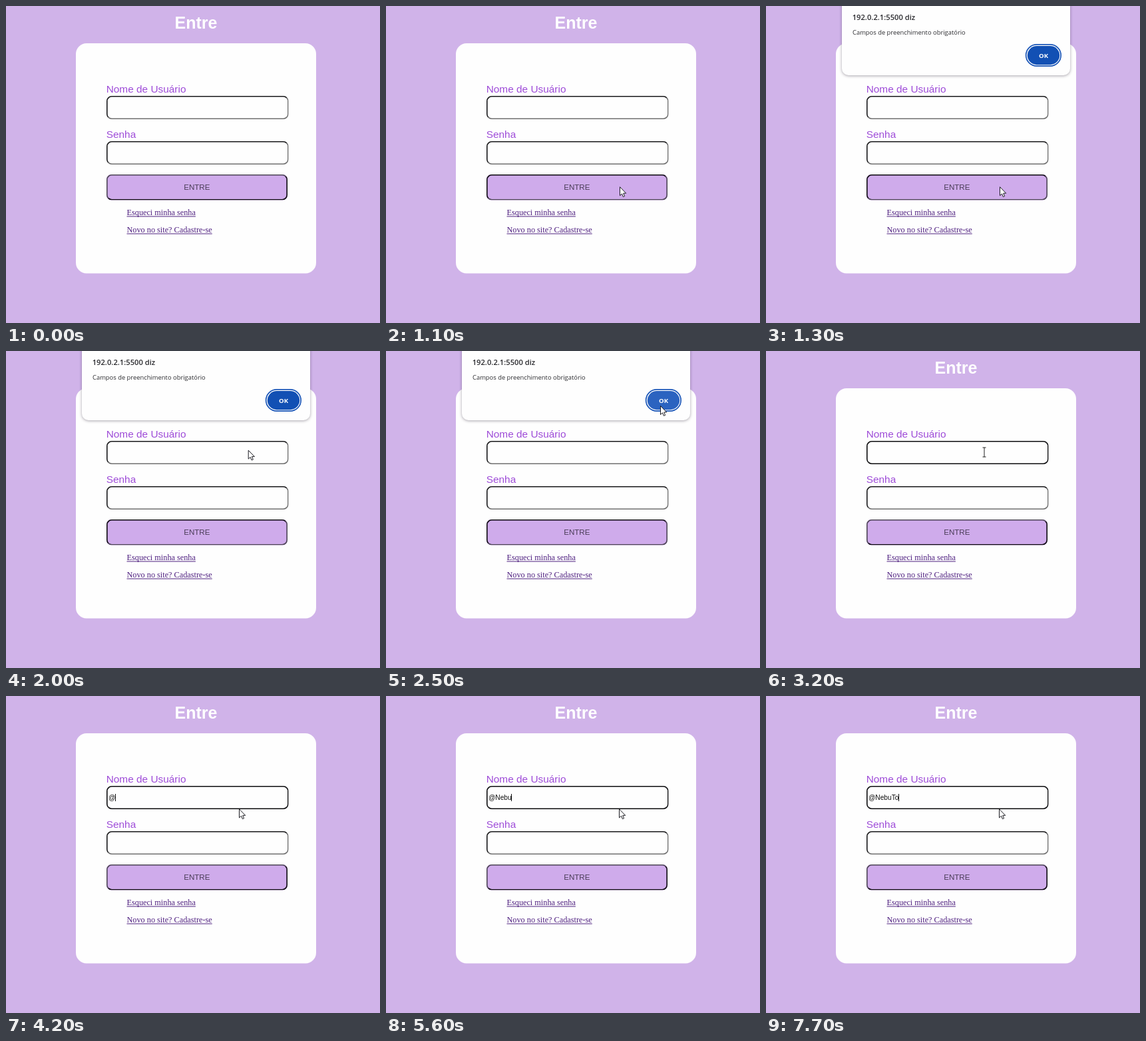
An HTML page with a canvas for the animation above (8 s loop, 562 by 476 pixels).

```html
<!DOCTYPE html>
<html lang="pt">
<head>
<meta charset="utf-8">
<title>Entre</title>
<style>
  html, body { margin: 0; width: 100%; height: 100%; overflow: hidden; background: #d0b3e9; }
  canvas { display: block; }
</style>
</head>
<body>
<canvas id="stage" width="562" height="476"></canvas>
<script>
const ctx = document.getElementById('stage').getContext('2d');
const LOOP = 8000, STEP = 100;
const SANS = '"Liberation Sans", Arial, sans-serif';
const SERIF = '"Liberation Serif", "Times New Roman", serif';
const UI = '"Open Sans", "Noto Sans", sans-serif';

const PRESS = 1100, ALERT = 1200, HOVER = 2400, DISMISS = 2600, FOCUS = 3000, LEAVE = 3500;
const USER = '@NebuTo';
const KEY_TIMES = [4100, 4900, 5100, 5500, 5600, 7400, 7700];

// Pointer glides, each one starting where the last ended; bow bends the path to the left
const ENTRY = { x: 494, y: 300, at: 600 };
const GLIDES = [
  { from: 600, to: 1000, x: 351, y: 271.2, bow: 0 },
  { from: 1400, to: 2400, x: 412, y: 82, bow: 30 },
  { from: 2500, to: 2600, x: 409, y: 84, bow: 0 },
  { from: 2600, to: 3000, x: 328, y: 152, bow: 0 },
  { from: 3400, to: 3600, x: 350, y: 169.3, bow: 0 }
];

const ARROW = new Path2D('M0 0V13L3 10.3L4.9 14.8L7.1 13.9L5.2 9.5H9.2Z');

const within = (t, a, b) => t >= a && t < b;
const clamp01 = k => Math.min(1, Math.max(0, k));
const ease = k => k * k * (3 - 2 * k);

function pointerAt(t) {
  let { x, y } = ENTRY;
  for (const g of GLIDES) {
    const k = ease(clamp01((t - g.from) / (g.to - g.from)));
    x += (g.x - x) * k - g.bow * Math.sin(Math.PI * k);
    y += (g.y - y) * k;
  }
  return [x, y];
}

function text(str, x, y, font, color, align = 'left') {
  ctx.font = font;
  ctx.fillStyle = color;
  ctx.textAlign = align;
  ctx.fillText(str, x, y);
}

function box(x, y, w, h, r) {
  ctx.beginPath();
  ctx.roundRect(x, y, w, h, r);
}

function fillBox(x, y, w, h, r, color) {
  box(x, y, w, h, r);
  ctx.fillStyle = color;
  ctx.fill();
}

function strokeBox(x, y, w, h, r, line, color) {
  box(x + line / 2, y + line / 2, w - line, h - line, r);
  ctx.lineWidth = line;
  ctx.strokeStyle = color;
  ctx.stroke();
}

// Rounded box whose top-left and bottom-right edges differ in colour
function bevel(x, y, w, h, fill, topLeft, bottomRight) {
  const m = h / 2, r = 7, line = 1.6;
  const half = (corner, color) => {
    ctx.save();
    ctx.beginPath();
    ctx.moveTo(x, y + h);
    ctx.lineTo(x + m, y + m);
    ctx.lineTo(x + w - m, y + m);
    ctx.lineTo(x + w, y);
    ctx.lineTo(...corner);
    ctx.clip();
    strokeBox(x, y, w, h, r, line, color);
    ctx.restore();
  };
  fillBox(x, y, w, h, r, fill);
  half([x, y], topLeft);
  half([x + w, y + h], bottomRight);
}

function field(label, y, focused) {
  text(label, 150.7, y - 4.6, '15.4px ' + SANS, '#9e4bd8');
  bevel(151, y, 273.6, 35, '#fefefe', focused ? '#0c0c0e' : '#18181a', focused ? '#0c0c0e' : '#707070');
}

function link(str, y) {
  const color = '#4f2080';
  text(str, 181.5, y, '12.25px ' + SERIF, color);
  ctx.fillRect(181.5, y + 1.5, ctx.measureText(str).width, 1);
}

function drawPage(focused, pressed) {
  ctx.fillStyle = '#d0b3e9';
  ctx.fillRect(0, 0, 562, 476);
  text('Entre', 285.5, 33.7, 'bold 25px ' + SANS, '#fff', 'center');
  fillBox(105, 56, 361, 345.5, 16, '#fefefe');

  field('Nome de Usuário', 135, focused);
  field('Senha', 203, false);

  const edges = ['#4d4655', '#0c0a0e'];
  if (pressed) edges.reverse();
  bevel(151, 253, 272, 38.5, '#cfabeb', ...edges);
  text('ENTRE', 286.8, 276.2, '11.6px ' + SANS, '#4a3d57', 'center');

  link('Esqueci minha senha', 314);
  link('Novo no site? Cadastre-se', 340);
}

function drawTyping(t) {
  const typed = USER.slice(0, KEY_TIMES.filter(k => k <= t).length);
  text(typed, 154, 156, '10.2px ' + SANS, '#111');
  if (t >= LEAVE && !within(t, 6200, 6400)) {
    ctx.fillRect(154 + Math.floor(ctx.measureText(typed).width), 147, 1, 11);
  }
}

function drawDialog(alpha, hover) {
  ctx.save();
  ctx.globalAlpha = alpha;
  ctx.shadowColor = 'rgba(40, 30, 50, 0.4)';
  ctx.shadowBlur = 4;
  ctx.shadowOffsetY = 1;
  fillBox(114, -20, 343, 124, 10, '#fefefe');
  ctx.shadowColor = 'transparent';
  text('192.0.2.1:5500 diz', 129.7, 21, '600 11.2px ' + UI, '#2a2a2e');
  text('Campos de preenchimento obrigatório', 130, 43, '9.4px ' + UI, '#2c2c30');
  strokeBox(389.8, 57, 54.2, 34, 17, 1.7, '#1a56b8');
  fillBox(392.8, 60, 48.4, 28.2, 14.1, hover ? '#2b63c0' : '#1250b4');
  text('OK', 417, 77.6, 'bold 9.6px ' + UI, '#fff', 'center');
  ctx.restore();
}

function drawArrow(x, y) {
  ctx.save();
  ctx.translate(x + 0.5, y + 0.5);
  ctx.fillStyle = '#fff';
  ctx.fill(ARROW);
  ctx.lineWidth = 1;
  ctx.strokeStyle = '#1c1c22';
  ctx.stroke(ARROW);
  ctx.restore();
}

function drawBeam(x, y) {
  ctx.fillStyle = '#222';
  ctx.fillRect(x - 0.5, y - 7, 1, 14);
  for (const dy of [-7.5, 6.5]) ctx.fillRect(x - 2.5, y + dy, 5, 1);
}

function draw(t) {
  drawPage(t >= FOCUS, within(t, PRESS, DISMISS));
  drawTyping(t);
  if (within(t, ALERT, DISMISS)) drawDialog(t < ALERT + STEP ? 0.7 : 1, t >= HOVER);
  if (t < ENTRY.at) return;
  const drawPointer = within(t, FOCUS - STEP, LEAVE) ? drawBeam : drawArrow;
  drawPointer(...pointerAt(t));
}

const start = performance.now();
function tick() {
  const t = (performance.now() - start) % LOOP;
  draw(Math.floor(t / STEP) * STEP);
  requestAnimationFrame(tick);
}
tick();
</script>
</body>
</html>
```
